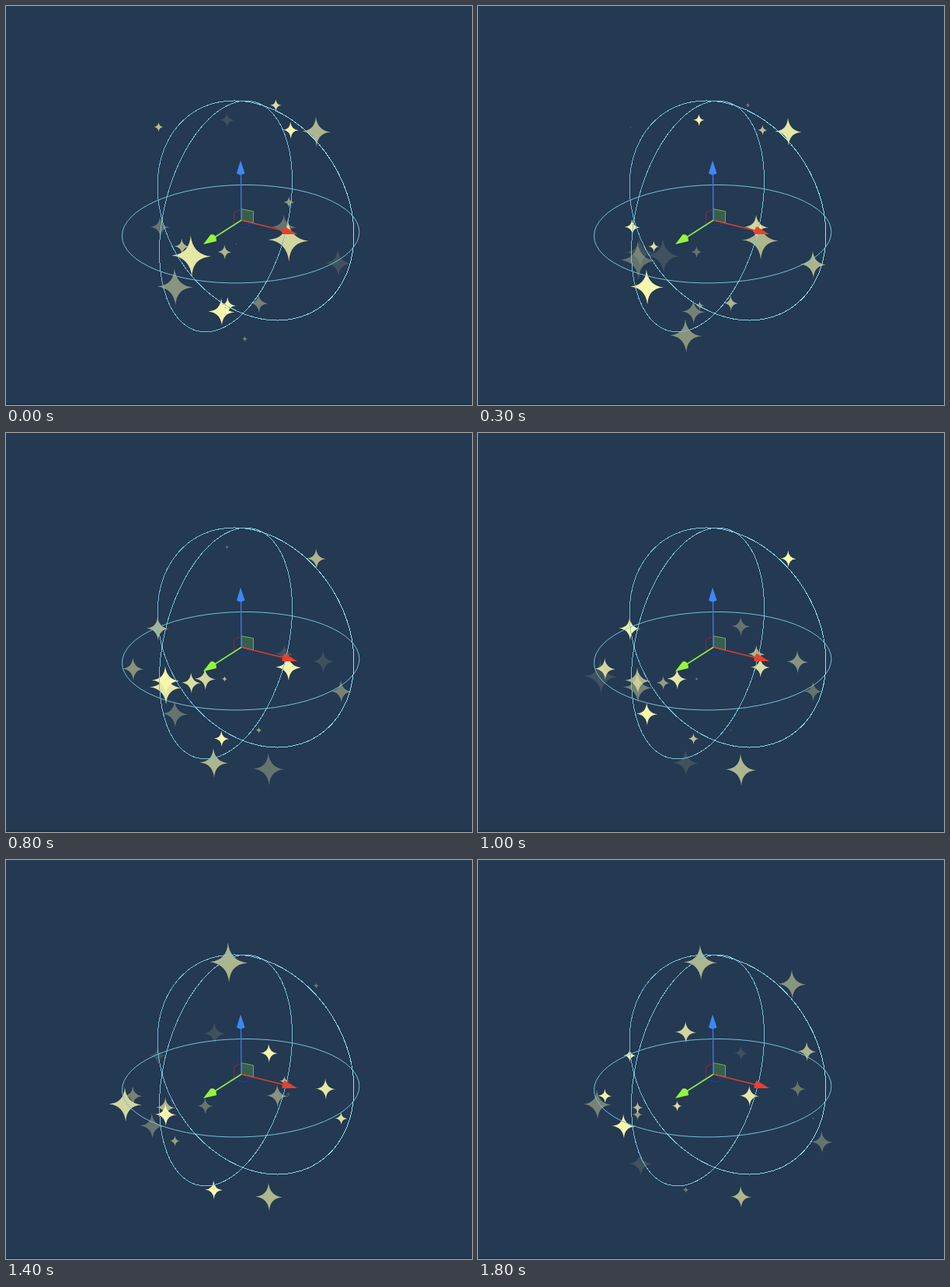
An HTML page that plays this animation: 600 px wide and 514 px high, repeating every 1.9 s.

```html
<!DOCTYPE html>
<html lang="en">
<head>
<meta charset="utf-8">
<title>Twinkling star emitter</title>
<style>
html, body { margin: 0; width: 100%; height: 100%; overflow: hidden; background: #243952; }
svg { display: block; width: 600px; height: 514px; }
.rings circle { fill: none; vector-effect: non-scaling-stroke; shape-rendering: crispEdges; }
</style>
</head>
<body>
<svg viewBox="0 0 600 514">
  <defs>
    <linearGradient id="ring">
      <stop offset="0" stop-color="#72b8d2"/>
      <stop offset="1" stop-color="#93e0f2"/>
    </linearGradient>
  </defs>
  <rect width="600" height="514" fill="#243952"/>
  <rect y="512" width="600" height="2" fill="#1e3045"/>
  <g id="stars" fill="#f6f7ad" transform="translate(.5 .9)"></g>
  <g class="rings" stroke="#78bfd8">
    <circle r="1" transform="matrix(152.7 -2.5 0 63.2 302.2 293.7)"/>
    <circle r="1" transform="matrix(85.5 -45.6 0 141.8 283 271)"/>
    <circle r="1" transform="matrix(126.5 31.3 0 138 321.5 263.5)" stroke="url(#ring)"/>
  </g>
  <g fill="none" stroke-linejoin="round">
    <path d="M303 276L318 280L308 286L293 283Z" stroke="#1d3fa8"/>
    <path d="M293.500 266L303.500 261.500V276L293.500 281Z" stroke="#922838"/>
    <path d="M303.500 261.500L318.500 264.500V279.500L303.500 276Z" fill="#365f50" stroke="#6ab544"/>
    <g stroke-width="1.5">
      <path d="M303 276L302.500 216" stroke="#3c74dc"/>
      <path d="M303 276L358 289.500" stroke="#d8402f"/>
      <path d="M303 276L267 299" stroke="#92ea42"/>
    </g>
  </g>
  <path d="M302 199L307.500 215.500Q302 219.500 297 215.500Z" fill="#3f86fa"/>
  <path d="M375 294L359 284Q355 288 355.500 294Z" fill="#e9402c"/>
  <path d="M254 307L263.500 294.500Q271 293 271 303Z" fill="#94f53c"/>
</svg>
<script>
const LOOP = 1900, STEP = 100, LIFE = 1900, FIRST_BIRTH = -1800;
const CENTER = [303, 276];

// One star is born every STEP ms: resting point and starting radius.
const STARS = [
  [296, 306, 15], [307, 428, 20], [364, 252, 24], [196, 155, 16], [347, 127, 16],
  [285, 385, 19], [366, 159, 17], [226, 309, 15], [198, 284, 18], [284, 146, 12],
  [325, 382, 14], [281, 316, 10], [238, 321, 28], [277, 393, 18], [363, 301, 27],
  [399, 161, 19], [217, 361, 23], [358, 284, 16], [431, 332, 17], [267, 424, 21],
  [205, 327, 23], [205, 318, 19], [256, 316, 14], [195, 251, 15], [163, 303, 14],
  [338, 433, 20], [411, 294, 14], [338, 248, 12], [153, 314, 22], [286, 131, 25],
  [349, 303, 14], [187, 342, 16], [267, 221, 14], [423, 246, 12], [404, 159, 18],
  [443, 363, 14], [206, 394, 15]
];

// A flash rises from `from`, holds at 1 and is gone by `to`.
const flash = (age, from, rise, to, fall) =>
  Math.min(1, (age - from) / rise, (to - age) / fall);

// Two flashes per life: a slow rise, then a slow fall.
const glow = age => Math.max(
  flash(age, -75, 575, 945, 375),
  flash(age, 910, 290, 1915, 595),
  .13
);

const layer = document.getElementById("stars");
const SHAPE = "M0-1Q.08-.08 1 0Q.08 .08 0 1Q-.08 .08-1 0Q-.08-.08 0-1Z";

const nodes = STARS.map(() => {
  const path = document.createElementNS("http://www.w3.org/2000/svg", "path");
  path.setAttribute("d", SHAPE);
  return layer.appendChild(path);
});

function draw(time) {
  STARS.forEach(([x, y, size], i) => {
    const age = time - (FIRST_BIRTH + i * STEP);
    const alive = age >= 0 && age < LIFE;
    nodes[i].setAttribute("visibility", alive ? "visible" : "hidden");
    if (!alive) return;
    // Stars drift outward for a moment, then settle.
    const reach = 1 - .03 * Math.exp(-age / 60);
    const px = CENTER[0] + (x - CENTER[0]) * reach;
    const py = CENTER[1] + (y - CENTER[1]) * reach;
    const r = size * (1 - (age / LIFE) ** 2);
    const lean = .03 * r;
    nodes[i].setAttribute("transform",
      `matrix(${r} ${lean} ${lean} ${1.05 * r} ${px} ${py})`);
    nodes[i].setAttribute("opacity", glow(age));
  });
}

const start = performance.now();
function tick() {
  const time = (performance.now() - start) % LOOP;
  draw(Math.floor(time / STEP) * STEP);
  requestAnimationFrame(tick);
}
tick();
</script>
</body>
</html>
```
